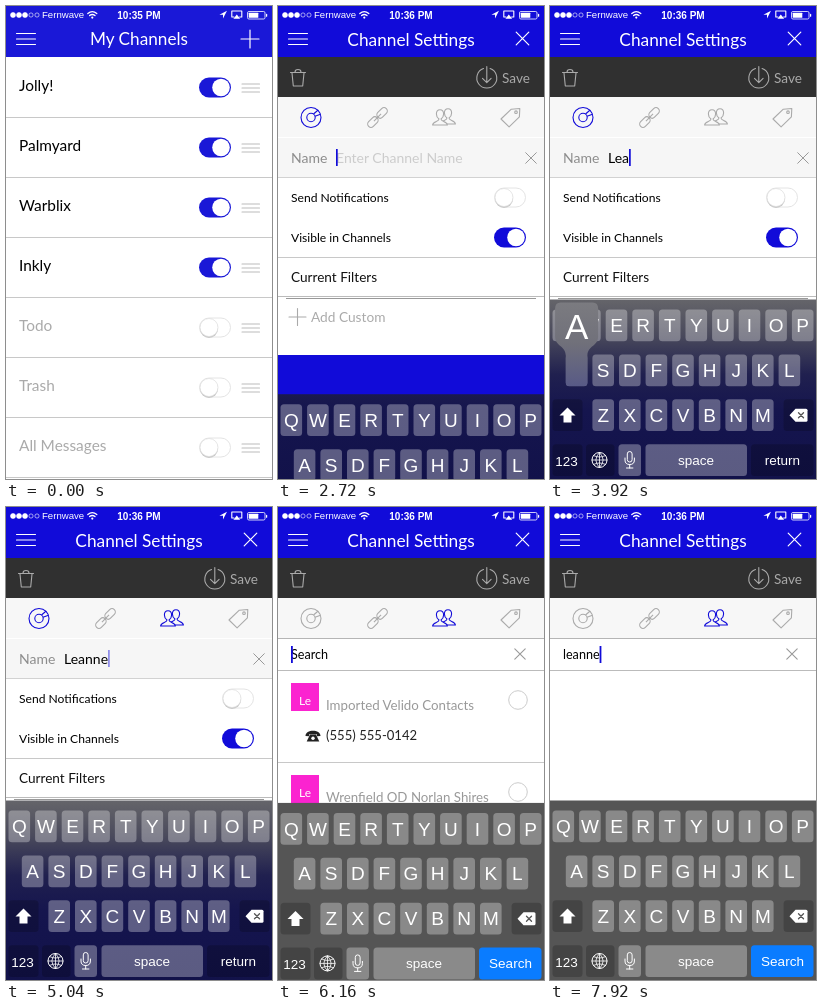
These frames come from a looping animation (266x473 px, 8000 ms). An HTML page:

```html
<!DOCTYPE html>
<html lang="en">
<head>
<meta charset="utf-8">
<title>Channel settings</title>
<style>
  html, body { margin: 0; width: 100%; height: 100%; overflow: hidden; background: #fff; }
  svg { display: block; width: 100vw; height: 100vh; font-family: Lato, sans-serif; }
  .sys { font-family: "Liberation Sans", Arial, sans-serif; }
  .line { fill: none; stroke-linecap: round; stroke-linejoin: round; }
</style>
</head>
<body>
<svg id="stage" viewBox="0 0 266 473"></svg>
<script>
const LOOP = 8000;
const stage = document.getElementById('stage');

// Markup helpers
const text = (x, y, size, fill, str, extra = '') =>
  `<text x="${x}" y="${y}" font-size="${size}" fill="${fill}" ${extra}>${str}</text>`;
const rect = (x, y, w, h, fill, r = 0, extra = '') =>
  `<rect x="${x}" y="${y}" width="${w}" height="${h}" rx="${r}" fill="${fill}" ${extra}/>`;
const path = (d, stroke, width = 1, extra = '') =>
  `<path class="line" d="${d}" stroke="${stroke}" stroke-width="${width}" ${extra}/>`;
const circle = (x, y, r, fill, extra = '') =>
  `<circle cx="${x}" cy="${y}" r="${r}" fill="${fill}" ${extra}/>`;
const group = (id, body, extra = '') => `<g id="${id}" ${extra}>${body}</g>`;
const rule = (y, color = '#c8c8c8', x = 0, w = 266) => rect(x, y, w, 1, color);
const cross = (x, y, r, color, width = 1) =>
  path(`M${x - r} ${y - r}l${2 * r} ${2 * r}M${x + r} ${y - r}l${-2 * r} ${2 * r}`, color, width);
const plus = (x, y, r, color, width = 1) =>
  path(`M${x - r} ${y}h${2 * r}M${x} ${y - r}v${2 * r}`, color, width);
const middle = 'text-anchor="middle"';

function toggle(x, y, on) {
  if (on) return rect(x, y - 10, 32, 20, 'currentColor', 10) + circle(x + 22, y, 8.8, '#fff');
  return rect(x + .5, y - 9.5, 31, 19, '#fff', 9.5, 'stroke="#e4e4e4"') +
    circle(x + 10, y + 1.4, 9, '#c9c9c9') +
    circle(x + 10, y, 9, '#fff', 'stroke="#dcdcdc" stroke-width=".7"');
}

function statusBar() {
  const dots = [0, 1, 2, 3, 4].map(i =>
    circle(7 + 6 * i, 9, i < 3 ? 2.5 : 2.1, i < 3 ? '#fff' : 'none', 'stroke="#fff" stroke-width=".6"')).join('');
  const wifi = path('M81.8 7.5q4.5 -3.8 9 0M83.6 9.6q2.7 -2.2 5.4 0', '#fff', 1.3) + circle(86.3, 11.6, 1.1, '#fff');
  const arrow = '<path d="M221 4.8L213.4 8.8H217V12.6Z" fill="#fff"/>';
  const cast = path('M228 11h-2.2v-6h10v6h-2.2', '#fff', 1.1) + '<path d="M230.8 8.6l3.4 4.2h-6.8z" fill="#fff"/>';
  const battery = rect(241.5, 5.5, 17.5, 7.5, 'none', 1.4, 'stroke="#fff" stroke-width=".8"') +
    rect(242.7, 6.7, 9.6, 5.1, '#fff', .5) + rect(260, 7.8, 1.2, 3, '#fff', .6);
  return dots + wifi + arrow + cast + battery + text(36, 12.4, 9.6, '#fff', 'Fernwave', 'class="sys"') +
    text(133, 12.6, 10, '#fff', '', `id="clock" class="sys" font-weight="700" ${middle}`);
}

function header() {
  return rect(0, 0, 266, 51, 'currentColor') + statusBar() +
    path('M10.5 27.5h19M10.5 33h19M10.5 38.5h19', '#fff', 1.1) +
    group('listHead', text(133, 39, 17.2, '#fff', 'My Channels', middle) + group('add', plus(244, 33, 9, '#fff', 1.2))) +
    group('formHead', text(133, 40, 17.3, '#fff', 'Channel Settings', middle) + cross(244.5, 32.5, 6.3, '#fff', 1.2));
}

function channelList() {
  const names = ['Jolly!', 'Palmyard', 'Warblix', 'Inkly', 'Todo', 'Trash', 'All Messages'];
  return rect(0, 51, 266, 422, '#fff') + names.map((name, i) => {
    const y = 60 * i, on = i < 4;
    return text(13, 85 + y, 15.4, on ? '#000' : '#aaa', name) + toggle(193, 81.5 + y, on) +
      path(`M236 ${78 + y}h17.5m-17.5 4h17.5m-17.5 4h17.5`, '#bbb', 1.1) + rule(111 + y);
  }).join('');
}

function toolbar() {
  const c = '#aaa';
  return rect(0, 51, 266, 40, '#303030') +
    path('M12.5 66.5h15M17 66.2q0 -2.7 3 -2.7t3 2.7M14 67l1.3 13h9.4l1.3 -13', c, 1.1) +
    path('M205.5 62.6a10 10 0 1 0 6.6 0M208.8 60.5v16M204.5 72.4l4.3 4.3l4.3 -4.3', c, 1.1) +
    text(224, 77, 13.6, c, 'Save');
}

function tabs() {
  const wrap = (id, body) => group(id, body, 'fill="none" stroke="#aaa" stroke-width="1.1" stroke-linejoin="round"');
  const link = x => `<rect x="${x}" y="-3.3" width="12" height="6.6" rx="3.3"/>`;
  const person = 'c-1.5 -1 -2.6 -2.8 -2.6 -5c0 -2.7 1.5 -4.3 3.6 -4.3s3.6 1.6 3.6 4.3c0 2.2 -1.1 4 -2.6 5c0 2.8 6 2 6.4 6h-14.8c.4 -4 6.4 -3.2 6.4 -6z';
  return rect(0, 91, 266, 40, '#f7f7f7') +
    wrap('tabMain', '<circle cx="33" cy="111.5" r="10"/><circle cx="33" cy="111.5" r="4.2"/><path d="M35.5 108l4.7 -4M37 110.2l5.5 -2"/>') +
    wrap('tabLink', `<g transform="translate(99.5 111.5) rotate(-45)">${link(-12.5)}${link(.5)}<path d="M-5 0H5"/></g>`) +
    wrap('tabPeople', `<path d="M169 112${person}"/><path d="M161 113${person}" fill="#f7f7f7"/>`) +
    wrap('tabTag', '<path d="M223 113l10.3 -9.8l8.5 -.7l-.4 8.3l-10.3 10z"/><circle cx="238" cy="106.2" r="1.3"/>') +
    rule(131, '#b5b5b5');
}

function formBody() {
  return rect(0, 131, 266, 218, '#fff') + rect(0, 349, 266, 124, 'currentColor') +
    rect(0, 132, 266, 39, '#f6f6f6') + rule(171, '#d2d2d2') +
    text(13, 157, 14, '#8c8c8c', 'Name') +
    text(58, 157, 14, '#ccc', 'Enter Channel Name', 'id="nameHint"') +
    text(58, 157, 14, '#000', '', 'id="nameText"') +
    rect(58, 143, 1.7, 17, 'currentColor', 0, 'id="nameCaret"') +
    cross(253, 152, 5.3, '#999') +
    text(13, 195.5, 12.1, '#000', 'Send Notifications') + toggle(216, 191.5, false) +
    text(13, 235.5, 12.1, '#000', 'Visible in Channels') + toggle(216, 231.5, true) +
    rule(251) + text(13, 276, 13.6, '#111', 'Current Filters') +
    rule(290, '#bbb') + rule(292, '#999', 8, 250) +
    plus(19.5, 311, 8.5, '#aaa', 1.1) + text(33, 316, 13.7, '#aaa', 'Add Custom');
}

function contact(y, place) {
  const phone = `<path d="M27.5 ${y + 53}c0 -7 15 -7 15 0l-3.6 .3v-2h-7.8v2z" fill="#222"/>` +
    `<path d="M32 ${y + 51.5}h6l3.3 7h-12.6z" fill="#222"/>` + circle(35, y + 55.3, 1.7, '#fff');
  return rect(13, y, 28, 28, '#fb23d0') + text(27, y + 22, 12, '#fff', 'Le', middle) +
    text(48, y + 27, 13.3, '#999', place) + circle(240, y + 17, 9.3, '#fff', 'stroke="#ccc"') +
    phone + text(48, y + 56.5, 13.1, '#222', '(555) 555-0142') + rule(y + 79);
}

function peopleBody() {
  return rect(0, 131, 266, 342, '#fff') + rule(131, '#b5b5b5') + rule(163, '#bbb') +
    group('contacts', contact(176, 'Imported Velido Contacts') +
      contact(268, 'Wrenfield OD Norlan Shires') + contact(360, 'Imported Velido Contacts')) +
    text(13, 151.5, 12.6, '#000', '', 'id="searchText"') +
    rect(13, 139, 1.8, 17, 'currentColor', 0, 'id="searchCaret"') + cross(242, 147, 5.2, '#999', 1.1);
}

// Keyboard
const ROWS = [['QWERTYUIOP', 2.5, 303.5], ['ASDFGHJKL', 15.8, 348.4], ['ZXCVBNM', 42.4, 393.3]];
const PITCH = 26.6, KEY_W = 21.6, KEY_H = 31.8, KB_H = 179.5;
const LIGHT = 'rgba(255,255,255,.31)', DARK = 'rgba(0,0,0,.2)';

function keyPlace(letter) {
  for (const [letters, x, y] of ROWS) {
    const i = letters.indexOf(letter);
    if (i >= 0) return { x: x + PITCH * i + KEY_W / 2, y };
  }
}

function keyboard() {
  const key = (x, y, w, fill) => rect(x, y, w, KEY_H, fill, 3.5);
  const letters = ROWS.map(([row, x, y]) => [...row].map((ch, i) =>
    key(x + PITCH * i, y, KEY_W, LIGHT) +
    text(x + PITCH * i + KEY_W / 2, y + 22.6, 19, '#fff', ch, middle)).join('')).join('');
  const y = 438.2;
  const shift = key(2.5, 393.3, 30, DARK) + '<path d="M17.5 401.5l8 8h-4v7h-8v-7h-4z" fill="#fff"/>';
  const erase = key(233.6, 393.3, 30, DARK) +
    '<path d="M239.5 409.3l6 -6.5h10.5q1.5 0 1.5 1.5v10q0 1.5 -1.5 1.5h-10.5z" fill="#fff"/>' + cross(251, 409.3, 2.5, '#555', 1.3);
  const globe = circle(49.5, 454, 7.5, 'none', 'stroke="#fff"') +
    path('M42 454h15M49.5 446.5v15M49.5 446.5q-7.5 7.5 0 15M49.5 446.5q7.5 7.5 0 15M43.7 449.6q5.8 3 11.6 0M43.7 458.4q5.8 -3 11.6 0', '#fff', .8);
  const mic = rect(77.3, 445.5, 4.8, 10.5, 'none', 2.4, 'stroke="#fff"') +
    path('M75 452v2q0 4.5 4.7 4.5t4.7 -4.5v-2M79.7 458.5v3.5M76.5 462h6.4', '#fff');
  return rect(0, 293.5, 266, KB_H + 1, '#555', 0, 'id="kbBack"') + `<g class="sys">${letters}${shift}${erase}` +
    key(2.5, y, 30, DARK) + text(16.5, 459.5, 13.5, '#fff', '123', middle) +
    key(36, y, 28.5, DARK) + globe + key(68.5, y, 22.5, LIGHT) + mic +
    key(95.5, y, 101.5, LIGHT) + text(146, 459, 13.5, '#fff', 'space', middle) +
    rect(201, y, 62.5, KEY_H, DARK, 3.5, 'id="goKey"') + text(232.5, 459, 13.5, '#fff', '', `id="goText" ${middle}`) +
    group('popup', '<path id="bubble"/>' + text(0, -15, 35, '#fff', '', `id="popText" ${middle}`)) + '</g>';
}

stage.innerHTML = `<defs>
  <linearGradient id="tint" gradientUnits="userSpaceOnUse" x1="0" x2="0" y1="293" y2="473">
    <stop offset="0" stop-color="#65656a"/><stop offset=".2" stop-color="#4a4a5c"/>
    <stop offset=".42" stop-color="#20204f"/><stop offset=".62" stop-color="#15154e"/><stop offset="1" stop-color="#12124a"/>
  </linearGradient>
  <linearGradient id="popTint" x1="0" x2="0" y1="0" y2="1">
    <stop offset="0" stop-color="#7b7b80"/><stop offset=".5" stop-color="#70707a"/><stop offset="1" stop-color="#585a86"/>
  </linearGradient></defs>` +
  group('list', channelList()) +
  group('settings', toolbar() + tabs() + group('form', formBody()) + group('people', peopleBody())) +
  header() + group('keys', keyboard());

const ui = {};
stage.querySelectorAll('[id]').forEach(el => ui[el.id] = el);

ui.bubble.setAttribute('d', 'M-16 -52H16Q21.5 -52 21.5 -46V-18C21.5 -8 10.8 -9 10.8 1V28Q10.8 31.5 7.3 31.5H-7.3Q-10.8 31.5 -10.8 28V1C-10.8 -9 -21.5 -8 -21.5 -18V-46Q-21.5 -52 -16 -52Z');

// Timing in ms
const NAME = 'Leanne';
const NAME_TIMES = [3280, 3580, 3880, 4140, 4400, 4610];
const SEARCH_TIMES = [6520, 6760, 6980, 7180, 7400, 7600];
const NAME_FOCUS = 2640, SEARCH_FOCUS = 5850, PEOPLE_TAP = 4960, PEOPLE_OPEN = 5160;

const clamp = v => Math.max(0, Math.min(1, v));
const span = (t, start, length) => clamp((t - start) / length);
const easeOut = p => 1 - (1 - p) ** 3;
const easeInOut = p => p * p * (3 - 2 * p);
const set = (el, name, value) => el.setAttribute(name, value);
const show = (el, on) => set(el, 'display', on ? 'inline' : 'none');
const typed = (t, times) => times.filter(at => at <= t).length;

function caretAlpha(t, focus, times) {
  if (t < focus) return 0;
  const last = times.filter(at => at <= t).pop() || focus;
  const phase = (t - last) % 1000;
  return phase < 500 ? 1 - span(phase, 350, 150) : span(phase, 850, 150);
}

function setField(label, caret, x, value, alpha) {
  label.textContent = value;
  const width = value && value !== 'Search' ? label.getComputedTextLength() : 0;
  set(caret, 'x', x + width);
  set(caret, 'opacity', alpha);
}

function draw(t) {
  stage.style.color = t < 960 ? '#1a18d7' : '#110bd9';
  ui.clock.textContent = t < 1840 ? '10:35 PM' : '10:36 PM';

  // Opening the settings page
  const slide = easeInOut(span(t, 1520, 640));
  set(ui.settings, 'transform', `translate(0 ${422 * (1 - slide)})`);
  show(ui.settings, slide > 0);
  set(ui.listHead, 'opacity', 1 - span(t, 1600, 300));
  set(ui.formHead, 'opacity', span(t, 1800, 360));
  set(ui.add, 'opacity', t >= 1280 ? .6 : 1);

  const people = t >= PEOPLE_OPEN;
  show(ui.form, !people);
  show(ui.people, people);
  set(ui.tabMain, 'stroke', people ? '#aaa' : 'currentColor');
  set(ui.tabPeople, 'stroke', t >= PEOPLE_TAP ? 'currentColor' : '#aaa');

  // Text fields
  const name = NAME.slice(0, typed(t, NAME_TIMES));
  show(ui.nameHint, !name);
  setField(ui.nameText, ui.nameCaret, 58, name, caretAlpha(t, NAME_FOCUS, NAME_TIMES));
  const query = NAME.toLowerCase().slice(0, typed(t, SEARCH_TIMES));
  setField(ui.searchText, ui.searchCaret, 13, query || 'Search', caretAlpha(t, SEARCH_FOCUS, SEARCH_TIMES));
  show(ui.contacts, !query);

  // Keyboard rise, fall and second rise
  const search = t >= 5700;
  const up = search ? easeOut(span(t, 5879, 370))
    : easeOut(span(t, 2650, 370)) * (1 - easeInOut(span(t, 5160, 360)));
  const drop = KB_H * (1 - up);
  set(ui.keys, 'transform', `translate(0 ${drop})`);
  show(ui.keys, up > 0);
  set(ui.kbBack, 'fill', people ? '#555' : 'url(#tint)');
  set(ui.tint, 'gradientTransform', `translate(0 ${-drop})`);
  set(ui.goKey, 'fill', search ? '#0a7cff' : DARK);
  ui.goText.textContent = search ? 'Search' : 'return';

  // Pressed key
  const times = search ? SEARCH_TIMES : NAME_TIMES;
  const hit = times.findIndex(at => t >= at - 60 && t < at + 100);
  show(ui.popup, hit >= 0);
  if (hit >= 0) {
    const letter = NAME[hit].toUpperCase();
    const { x, y } = keyPlace(letter);
    set(ui.popup, 'transform', `translate(${x} ${y})`);
    set(ui.bubble, 'fill', search ? '#8a8a8a' : 'url(#popTint)');
    ui.popText.textContent = letter;
  }
}

const start = performance.now();
function tick() {
  draw((performance.now() - start) % LOOP);
  requestAnimationFrame(tick);
}
tick();
</script>
</body>
</html>
```
